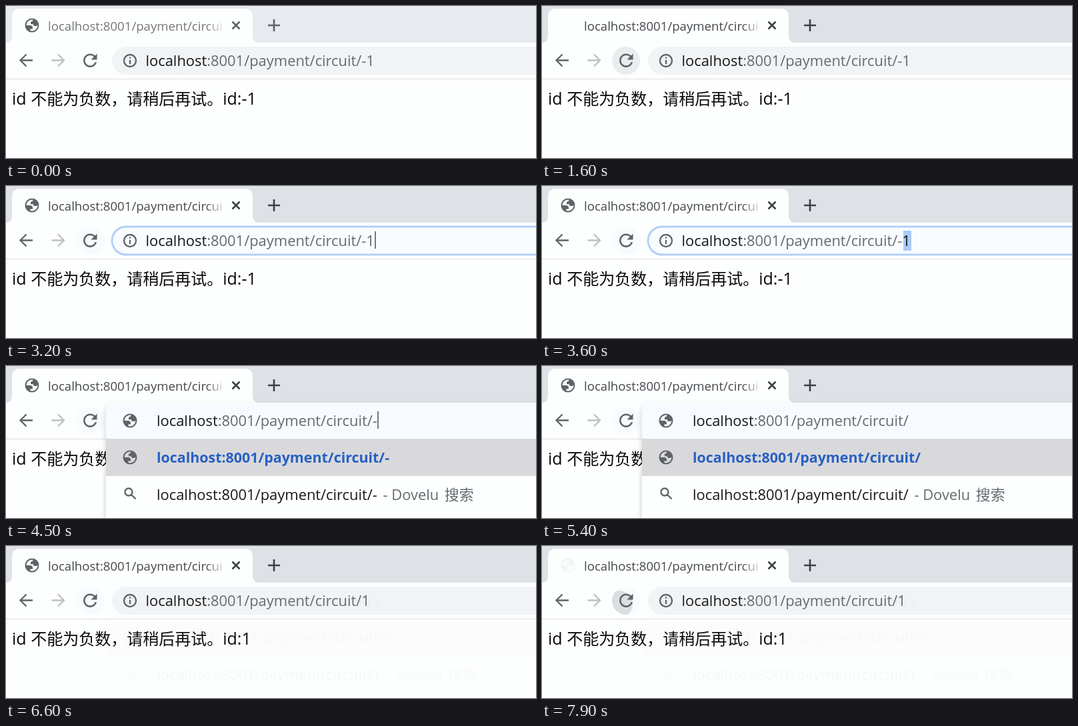
Write an HTML page that moves like this. It is 795x228 px and loops after 8 s.

```html
<!DOCTYPE html>
<html lang="zh-CN">
<meta charset="utf-8">
<title>Circuit demo</title>
<style>
  html, body { margin: 0; width: 100%; height: 100%; overflow: hidden; background: #fdfefe }
  svg { display: block; font: 21.9px "Open Sans", "Noto Sans CJK SC", "Noto Sans CJK", sans-serif }
  text { white-space: pre }
  .line { fill: none; stroke: #5f6368; stroke-width: 2.3 }
  .icon { fill: #5f6368; fill-rule: evenodd }
  .url { fill: #666a6f }
  .host, .selected { fill: #17181a }
  .cjk { font-size: 24px }
  .match { font-size: 21.4px; font-weight: bold; fill: #2860c4 }
  #popup { filter: drop-shadow(0 4px 5px #0003) }
</style>
<svg width="795" height="228" viewBox="0 0 795 228">
  <defs>
    <path id="globe" class="icon" transform="scale(1.05) translate(-12 -12)" d="M12 2a10 10 0 1 1 0 20a10 10 0 1 1 0-20zM4 12h4.400c3.407.022 4.922 1.730 4.543 5.127H9.488v2.470a8 8 0 0 0 10.498-8.080C19.327 12.504 18.333 13 17 13c-2.137 0-3.206-.916-3.206-2.750h-3.748c-.274-2.728.683-4.092 2.870-4.092 0-.975.327-1.597.811-1.970A8 8 0 0 0 4 12z"/>
    <linearGradient id="fade"><stop stop-color="#fdfefe" stop-opacity="0"/><stop offset="1" stop-color="#fdfefe"/></linearGradient>
    <clipPath id="button"><circle cx="126" cy="82" r="21"/></clipPath>
    <clipPath id="titleArea"><path d="M60 5H325V54H60z"/></clipPath>
  </defs>

  <!-- tab strip -->
  <rect id="strip" width="795" height="55"/>
  <path fill="#fdfefe" d="M0 55Q9 55 9 45V16Q9 4 21 4H358Q370 4 370 16V45Q370 55 380 55z"/>
  <use id="favicon" href="#globe" x="39" y="29"/>
  <g clip-path="url(#titleArea)">
    <text id="title" x="63" y="37" font-size="18.6">localhost:8001/payment/circuit</text>
    <rect x="300" y="8" width="30" height="42" fill="url(#fade)"/>
  </g>
  <path id="tabButtons" class="line" style="stroke-width:2.6" d="M339.500 23.500l11 11m0-11l-11 11M393 29h18m-9-9v18"/>

  <!-- toolbar -->
  <path class="line" d="M40 81.500H21.500M30.500 72.500l-9 9 9 9"/>
  <path class="line" style="stroke:#bdc0c3" d="M68.500 81.500H87M78 72.500l9 9-9 9"/>
  <circle id="hover" cx="126" cy="82" r="21"/>
  <circle id="ripple" cx="116" cy="87" r="20" fill="#dcdee1" clip-path="url(#button)"/>
  <path class="icon" transform="translate(110.900 66.300) scale(1.28)" d="M17.65 6.35A7.958 7.958 0 0 0 12 4c-4.42 0-7.99 3.58-7.99 8s3.57 8 7.99 8c3.73 0 6.84-2.55 7.73-6h-2.08A5.99 5.99 0 0 1 12 18c-3.31 0-6-2.69-6-6s2.69-6 6-6c1.66 0 3.14.69 4.22 1.78L13 11h7V4l-2.35 2.35z"/>
  <rect id="omnibox" x="159" y="61" width="680" height="42" rx="21"/>
  <circle class="line" cx="186" cy="82" r="9"/>
  <path class="line" d="M186 81v6M186 76.500v2.300"/>
  <rect id="selection" y="67" height="30" fill="#abcaf8"/>
  <text class="url" id="address" x="209.500" y="90"></text>
  <path stroke="#dfe1e4" d="M0 109.500H795"/>

  <!-- page -->
  <text x="9" y="147.500" font-size="25" fill="#080808">id <tspan class="cjk">不能为负数，请稍后再试。</tspan>id:<tspan id="pageId"></tspan></text>

  <!-- suggestions -->
  <g id="popup">
    <rect id="sheet" x="150" y="55" width="700" rx="13" fill="#fdfefe"/>
    <path fill="#f7fbff" d="M150 109V68Q150 55 163 55H795V109z"/>
    <path fill="#d9d9db" d="M150 109H795V165H150z"/>
    <use href="#globe" x="186" y="82"/>
    <use href="#globe" x="186" y="137"/>
    <path class="line" d="M189.500 189a5.500 5.500 0 1 0-11 0a5.500 5.500 0 1 0 11 0M188 193l6.500 6.500"/>
    <text class="url" id="typed" x="226" y="90"></text>
    <text class="match" id="match" x="226" y="145"></text>
    <text class="host" x="226" y="201"><tspan id="query"></tspan><tspan class="url" dx="3"> - Dovelu <tspan dx="3">搜索</tspan></tspan></text>
  </g>
  <rect id="caret" y="68" width="1.300" height="26" fill="#333"/>
</svg>
<script>
  const $ = id => document.getElementById(id);
  const LOOP = 8000, PATH = ':8001/payment/circuit/';

  const within = (t, from, to) => t >= from && t < to;
  const show = (id, on) => $(id).setAttribute('visibility', on ? 'visible' : 'hidden');
  const paint = (id, fill) => $(id).setAttribute('fill', fill);
  const write = (id, text) => { if ($(id).textContent !== text) $(id).textContent = text; };

  function writeUrl(id, value, selected = '') {
    const key = value + '|' + selected, el = $(id);
    if (el.dataset.key === key) return;
    el.dataset.key = key;
    const all = selected === 'all', one = selected === 'word';
    const tail = one ? `-<tspan class="selected">1</tspan>` : value;
    el.innerHTML = `<tspan class="host">localhost</tspan>` +
      (all ? `<tspan class="selected">${PATH + value}</tspan>` : PATH + tail);
  }

  function render(t) {
    const active = t >= 600, open = within(t, 4500, 6600), loaded = t >= 6600;
    const focused = within(t, 3200, 4500);

    paint('strip', active ? '#dee1e6' : '#e7eaee');
    paint('title', active ? '#45484c' : '#74777b');
    $('tabButtons').style.stroke = active ? '#3c4043' : '#5f6368';

    // each reload blanks the tab icon for a moment
    const reloading = [1000, 1600, 2000].some(s => within(t, s, s + 100));
    $('favicon').setAttribute('opacity', reloading ? 0 : t >= 7900 ? .06 : 1);
    show('hover', active);
    paint('hover', t < 3200 ? '#ebecee' : '#f8fafd');
    show('ripple', within(t, 1700, 1800) || t >= 7900);

    paint('omnibox', focused ? '#f8fcff' : '#f1f3f4');
    $('omnibox').style.cssText = focused ? 'stroke:#b3d0f9;stroke-width:3' : '';

    const selected = within(t, 3300, 3600) ? 'all' : within(t, 3600, 4500) ? 'word' : '';
    writeUrl('address', loaded ? '1' : '-1', selected);
    write('pageId', loaded ? '1' : '-1');
    show('selection', selected);
    const start = selected === 'all' ? 210 : 542;
    $('selection').setAttribute('x', start);
    $('selection').setAttribute('width', 554 - start);

    const value = t < 4900 ? '-' : t < 5800 ? '' : '1';
    show('popup', open || loaded);
    $('popup').setAttribute('opacity', loaded ? .025 : 1);
    $('sheet').setAttribute('height', t < 5800 ? 190 : 165);
    writeUrl('typed', value);
    write('match', 'localhost' + PATH + value);
    write('query', 'localhost' + PATH + value);

    show('caret', within(t, 3200, 3300) || within(t, 4500, 5400) || within(t, 5800, 6300));
    const field = $(open ? 'typed' : 'address');
    $('caret').setAttribute('x', +field.getAttribute('x') + field.getComputedTextLength() + .5);
  }

  (function tick() {
    render(performance.now() % LOOP);
    requestAnimationFrame(tick);
  })();
</script>
</html>
```
